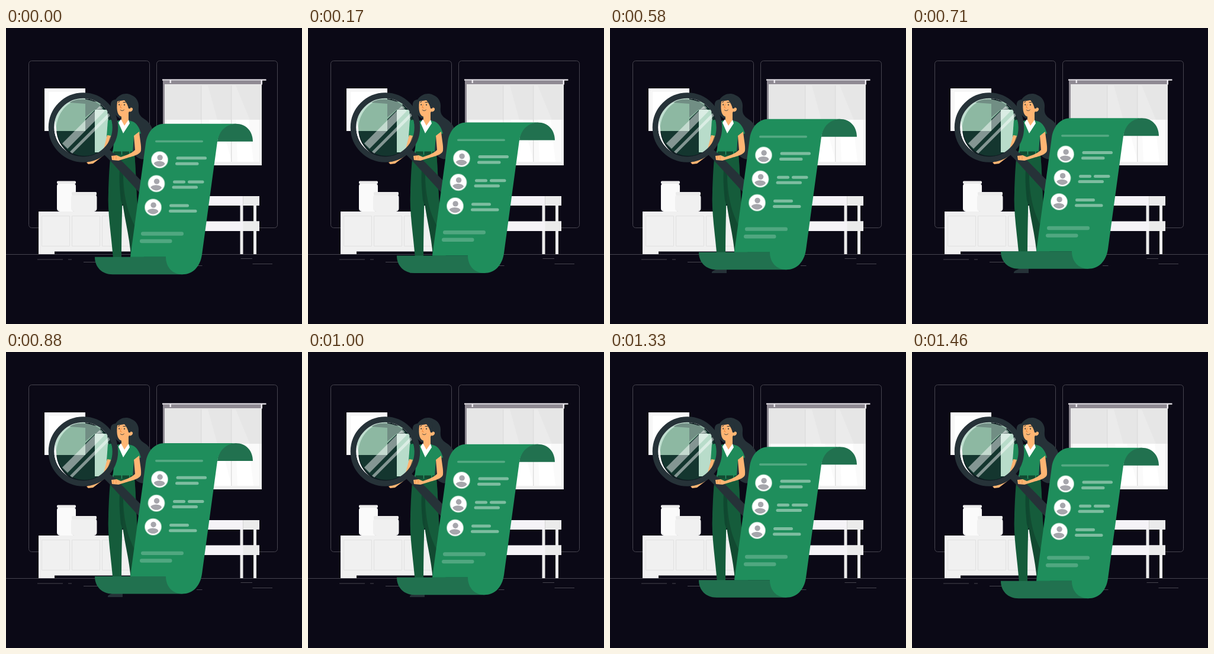
Recreate the animation shown at these times as an HTML page. Size 500 by 500 pixels, loop 1.5 s.

```html
<!DOCTYPE html>
<html lang="en">
<head>
<meta charset="utf-8">
<title>Checking the list</title>
<style>
  html, body { margin: 0; width: 100%; height: 100%; overflow: hidden; background: #0b0916; }
  svg { display: block; width: 100%; height: 100%; }
  .ink { fill: #263238; }
  .skin { fill: #ffb573; }
  .line { fill: none; stroke: #47454f; }
  .seam { fill: none; stroke: #e1e1e1; }
</style>
</head>
<body>
<svg viewBox="0 0 500 500">
  <defs>
    <clipPath id="glass"><circle cx="130.5" cy="168" r="49.5"/></clipPath>
    <clipPath id="face"><circle r="11.5"/></clipPath>
    <g id="avatar">
      <circle r="14.6" fill="#8fc7ab"/>
      <circle r="13.6" fill="#fff"/>
      <g fill="#a6a6ac" clip-path="url(#face)">
        <circle cx=".6" cy="-3.8" r="4.7"/>
        <ellipse cx="-.6" cy="7.4" rx="9.6" ry="5.2"/>
      </g>
    </g>
  </defs>

  <g class="line">
    <rect x="38.5" y="55.5" width="204" height="282" rx="5"/>
    <rect x="254.5" y="55.5" width="204" height="282" rx="5"/>
    <path d="M0 382.5H500M53 391H96M105 391H111M131 395.5H158M322 401.5H331.5M396.5 389.5H416M416.5 398.5H450"/>
  </g>

  <!-- wall picture -->
  <path d="M65 102H134V174H65Z" fill="#fafafa"/>
  <path d="M71 107H128V168H71Z" fill="#fff" stroke="#f0f0f0"/>

  <!-- window and blind -->
  <path d="M265 89H433V96H268V232H265Z" fill="#8f8a93"/>
  <path d="M268 95H432V232H268Z" fill="#f0f0f0"/>
  <path d="M271 155H329V226H271ZM331 155H380V226H331ZM382 155H428V226H382Z" fill="#fafafa"/>
  <path d="M343 155H363L380 222V226H352ZM388 155H410L418 226H391Z" fill="#fff"/>
  <path d="M268 95.500H432V155H268Z" fill="#e6e6e6"/>
  <path d="M341 97L357 155H331V97ZM388 97L412 155H382V97Z" fill="#ebebeb"/>
  <path d="M329.500 97V155M380.500 97V226" stroke="#dcdcdc" fill="none"/>
  <path d="M264 86.500H439.500V88.800H264ZM276.500 88H279V93H276.500ZM430.500 88H433V95H430.500Z" fill="#e9e6ec"/>

  <!-- side table -->
  <path d="M395.500 299H400.500V382H395.500ZM418 299H423V382H418Z" fill="#ebebeb"/>
  <path d="M325 284H428V300H325ZM325 326.500H428V343H325Z" fill="#f5f3f7"/>
  <path d="M400.500 284H428V300H400.500ZM400.500 326.500H428V343H400.500Z" fill="#ebebeb"/>
  <path d="M400.500 284V300" stroke="#d5d5d5"/>

  <!-- cabinet and jars -->
  <path d="M55 310H225V377.500H82V382H55Z" fill="#f0f0f0"/>
  <path class="seam" d="M60.500 317.500H107.500V368.500H60.500ZM111.500 317.500H158.500V368.500H111.500ZM162.500 317.500H209.500V368.500H162.500Z"/>
  <rect x="86" y="262" width="32" height="48" rx="5" fill="#fafafa"/>
  <rect x="86" y="258.500" width="32" height="4.500" rx="1.500" fill="#ebebeb"/>
  <rect x="110" y="281" width="43.500" height="29" rx="5" fill="#f0f0f0"/>
  <rect x="111" y="277" width="42" height="5.500" rx="1.500" fill="#ebebeb"/>
  <path d="M190 300H203V310H190Z" fill="#fafafa"/>

  <!-- woman -->
  <path class="ink" d="M185 121C192 111 203 109 211 113C220 116 225 125 224 134C223 144 226 149 234 154C245 161 251 173 248 187C245 201 246 212 239 219C231 225 220 220 214 210L199 155C189 153 183 145 180 139C174 130 177 121 185 121Z"/>
  <path d="M192 214H217C220 246 220 274 222 300C223 321 231 352 233 387H211C209 350 198 316 195 278Z" fill="#124a31"/>
  <path d="M177 212H217C220 246 219 274 223 305L221 340C211 323 199 297 198 250C196 301 195 345 195 390H181C178 350 171 310 173 277C174 246 175 230 177 212Z" fill="#155c3b"/>
  <path d="M195 222C190 240 191 262 194 291L197 300L198 250Z" fill="#0f4830"/>
  <path class="ink" d="M182 406H197V414H172C171 410 178 409 182 406Z"/>
  <path class="skin" d="M173 178L182 182C178 195 176 206 169 212C161 218 154 224 147 229L139 230L136 227L149 222C163 211 167 196 173 178Z"/>
  <path class="skin" d="M195 142H207V160L201 174L191 159L195 155Z"/>
  <path d="M192 156C185 157 180 160 177 164C173 170 171 176 171 181L181 184C182 193 182 201 180 209H214L216 183L228 178C225 168 221 161 214 158L207 156L201 168Z" fill="#1f8b5a"/>
  <path d="M194 154L190 160L198 178L209 161L207 155L200 165Z" fill="#fff"/>
  <path d="M178.500 208.500H216V214H178Z" fill="#124a31"/>
  <path d="M181 208V214M195.500 208V214M209 208V214" stroke="#299564" stroke-width="1.500"/>
  <path class="skin" d="M188 124C191 119 199 119 205 123L209 136C211 133 215 135 214 138C213 141 210 142 208 141C206 147 201 150 196 150C189 149 186 140 188 124Z"/>
  <path class="ink" d="M187 124C191 115 204 115 211 121L210 136L207 136C206 131 204 127 200 122Z"/>
  <g fill="none" stroke="#263238" stroke-linecap="round">
    <path d="M189.500 125.500L192 124.500M198 125.500L202 125.500" stroke-width="1"/>
    <path d="M191.200 129V130M200 129.300V130.300" stroke-width="1.600"/>
    <path d="M194.500 129L193 134.500L195.500 135" stroke="#ed893e" stroke-width="1"/>
    <path d="M193.500 138.500C195.500 140.500 198 140 199.500 138" stroke-width=".9"/>
  </g>

  <!-- magnifier -->
  <g clip-path="url(#glass)">
    <circle cx="130.500" cy="168" r="50" fill="#1b9b64" opacity=".13"/>
    <circle cx="132.500" cy="169" r="47" fill="#14362f"/>
    <path d="M80 102H134V174H80Z" fill="#c0dfd0"/>
    <path d="M85 174C84 152 96 131 116 123L164 125L134 154V174Z" fill="#8db8a2"/>
    <path d="M107 126C126 114 155 123 164 135L148 139L134 151V128Z" fill="#718e84"/>
    <path d="M150 138H171L173 158L170 187L165 210H150Z" fill="#b8dcca"/>
    <path d="M172 156L182 154V185L170 184Z" fill="#1f8b5a"/>
    <path class="skin" d="M171 181L177 182L168 206L165 204Z"/>
    <path d="M95 195L158 132L167 140L104 204ZM108 209L174 143L177 147L112 212Z" fill="#fff" opacity=".48"/>
    <path d="M81 168A49.500 49.500 0 0 1 173 143A45 45 0 0 0 85 170C85 188 94 202 106 211A49 49 0 0 1 81 168Z" fill="#fff"/>
  </g>
  <circle cx="130.500" cy="168" r="54" fill="none" stroke="#263238" stroke-width="9.500"/>
  <path class="ink" d="M164 212L174 205L184 213L262 292L250 305L174 222Z"/>
  <path class="skin" d="M216 182L225 175C226 188 229 199 228 207C227 214 213 217 203 220L190 224L179 223L178 216L187 215L194 218C204 215 213 211 218 206Z"/>
  <path d="M182 216L181 222M186 216L186 222" stroke="#ed893e" stroke-width=".7"/>

  <!-- paper scroll -->
  <g id="scroll">
    <path d="M357 192C359 173 371 162 388 162C406 162 417 175 417 192ZM150 387H274L298 416.500H180C162 416.500 150 404 150 387Z" fill="#21714f"/>
    <path d="M268 162H390C372 162 360 174 357 192L331 383C328 404 315 416.500 298 416.500C281 416.500 270 404 270 387H210L236 195C239 175 251 162 268 162Z" fill="#1f8e5c"/>
    <g id="rows" stroke="#fff" stroke-linecap="round"></g>
    <use href="#avatar" x="259.500" y="223"/>
    <use href="#avatar" x="254" y="263.300"/>
    <use href="#avatar" x="248.500" y="303.300"/>
  </g>
</svg>
<script>
  // left, right, y, thickness, opacity
  const bars = [
    [252, 333, 191.8, 3.6, .24],
    [287.500, 339, 220.2, 5, .42], [286, 325.500, 229.6, 5, .42],
    [282, 303, 260.4, 5, .42], [307, 334.500, 260.4, 5, .42], [280.500, 324, 269.4, 5, .42],
    [276, 309, 300.4, 5, .42], [275, 322.500, 309.6, 5, .42],
    [228, 300, 347.8, 6.4, .22], [226, 280.500, 360.4, 6.4, .22]
  ];
  document.getElementById('rows').innerHTML = bars.map(([a, b, y, w, o]) =>
    `<path d="M${a + w / 2} ${y}H${b - w / 2}" stroke-width="${w}" opacity="${o}"/>`).join('');

  const LOOP = 1500, STEP = 1000 / 24, LEAD = 28, RISE = 10;
  const scroll = document.getElementById('scroll');
  const start = performance.now();

  // Linear float up and down, advanced 24 times a second.
  function draw(now) {
    const t = Math.max(0, now - start) % LOOP;
    const tick = Math.floor((t + 4) / STEP) * STEP;
    const phase = (tick + LEAD) % LOOP / LOOP;
    const lift = RISE * (1 - Math.abs(1 - 2 * phase));
    scroll.setAttribute('transform', `translate(0 ${-lift.toFixed(3)})`);
    requestAnimationFrame(draw);
  }
  draw(start);
</script>
</body>
</html>
```
